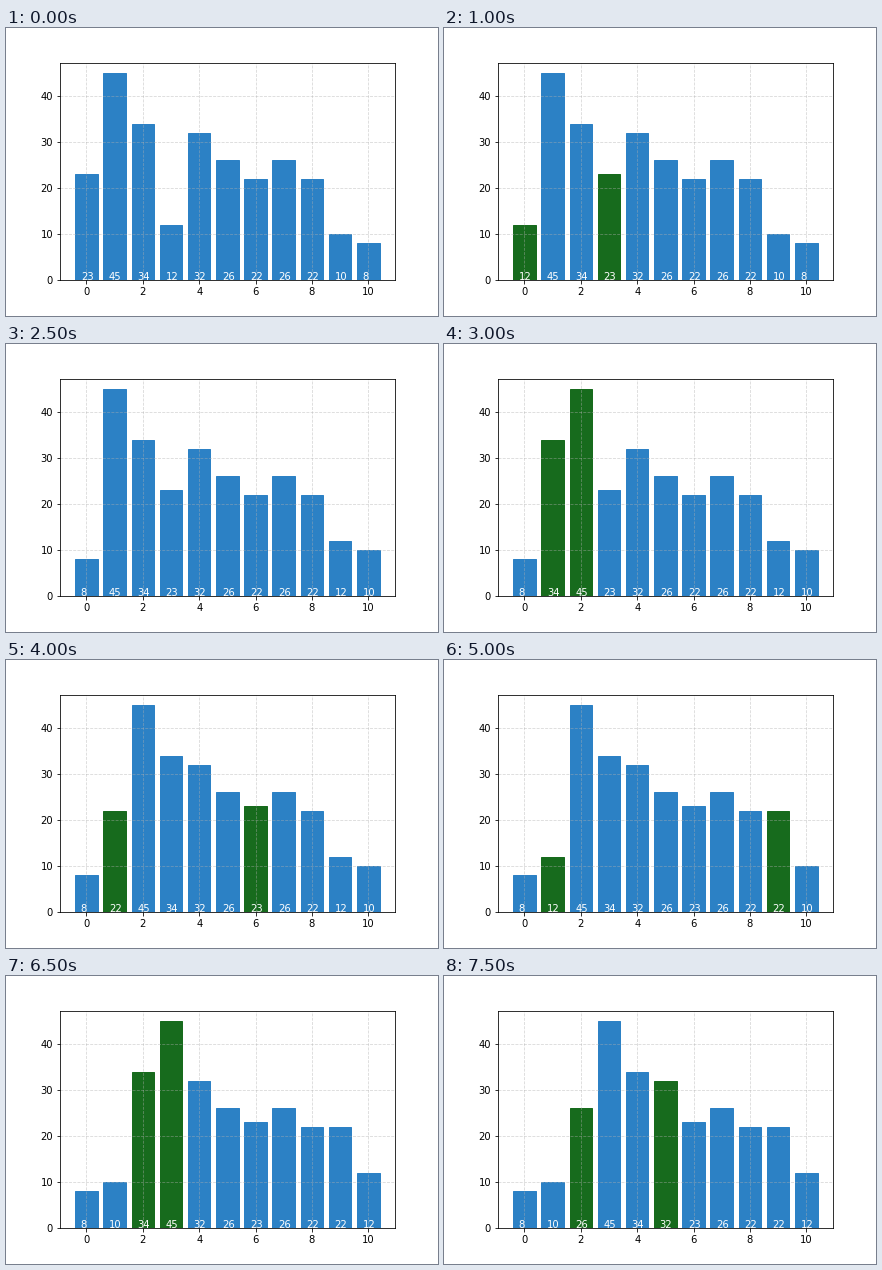
Animation, 432 px wide and 288 px high, one loop 8000 ms. Source, as a matplotlib script:

```python
from itertools import islice

import matplotlib.pyplot as plt
from matplotlib.animation import FuncAnimation

VALUES = [23, 45, 34, 12, 32, 26, 22, 26, 22, 10, 8]
BLUE, GREEN = "#2c81c5", "#176b1d"
FRAMES, INTERVAL = 16, 500

plt.rcParams.update({"font.family": "DejaVu Sans", "font.size": 10})


def sort_steps(values):
    """Exchange sort: yield the list at the start and after every swap."""
    data = list(values)
    yield tuple(data)
    for i in range(len(data)):
        for j in range(i, len(data)):
            if data[i] >= data[j]:
                data[i], data[j] = data[j], data[i]
                yield tuple(data)


steps = list(islice(sort_steps(VALUES), FRAMES))

fig, ax = plt.subplots(figsize=(6, 4), dpi=72, facecolor="white")
fig.subplots_adjust(left=0.125, right=0.9, bottom=0.125, top=0.88)

bars = ax.bar(range(len(VALUES)), VALUES, width=0.8, color=BLUE)
labels = [ax.text(x - 0.2, 0, str(v), color="white") for x, v in enumerate(VALUES)]
ax.set_xlim(-0.94, 10.94)
ax.set_ylim(0, 47.25)
ax.set_xticks(range(0, 11, 2))
ax.set_yticks(range(0, 41, 10))
ax.grid(linestyle="--", alpha=0.5)


def update(frame):
    now, before = steps[frame], steps[max(frame - 1, 0)]
    for bar, label, value, old in zip(bars, labels, now, before):
        bar.set_height(value)
        bar.set_color(BLUE if value == old else GREEN)
        label.set_text(str(value))
    return [*bars, *labels]


anim = FuncAnimation(fig, update, frames=FRAMES, interval=INTERVAL,
                     repeat=True, repeat_delay=0, blit=False)
plt.show()
```
